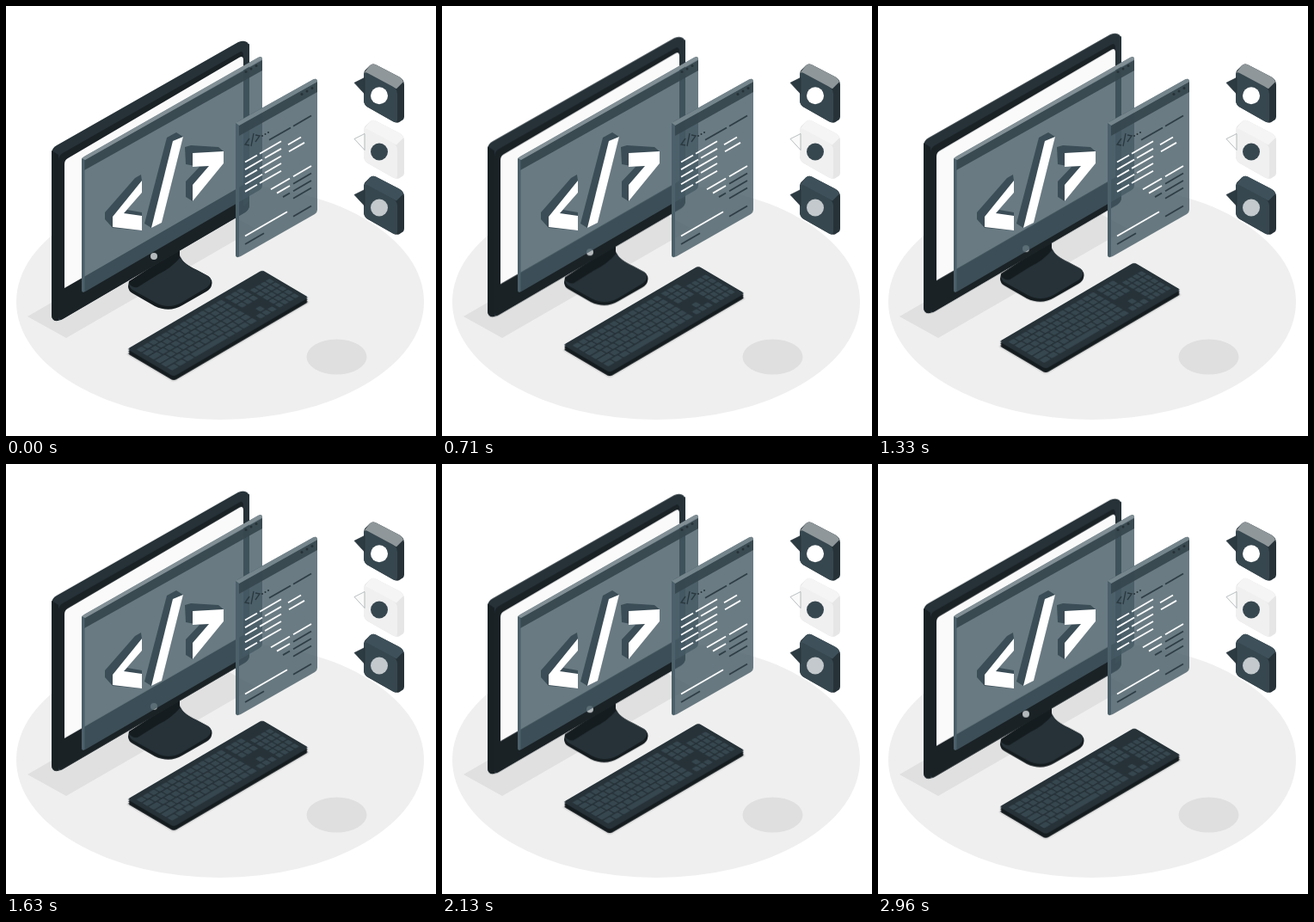
Animation of 500 by 500 pixels, one loop 3000 ms. Source, as an HTML page:

```html
<!DOCTYPE html>
<html lang="en">
<head>
<meta charset="utf-8">
<title>Isometric workstation</title>
<style>
  html, body { margin: 0; width: 100%; height: 100%; overflow: hidden; background: #fff; }
  svg { display: block; width: 100%; height: 100%; }
  .float { animation: float 3s linear infinite; }
  @keyframes float { 50% { transform: translateY(-10px); } }
</style>
</head>
<body>
<svg viewBox="0 0 500 500">
  <!-- floor -->
  <ellipse cx="249" cy="344" rx="237" ry="137" fill="#efefef"/>
  <path d="M25 361L70 386L290 259L245 234Z" fill="#e0e0e0"/>
  <ellipse cx="384.5" cy="408" rx="35" ry="20.5" fill="#dfdfdf"/>

  <g class="float">
    <!-- stand -->
    <path d="M143 320L202 282V290C204 298 214 303 222 307L235 314Q241 318 239 325Q238 329 233 332L205 348Q190 357 173 349L147 334Q142 331 142 326Z" fill="#151c1f"/>
    <path d="M153 327L177 312Q192 305 203 292C206 299 215 304 222 307L235 314Q242 319 234 327L204 345Q189 353 174 345L147 330Q143 327 143 323Q147 328 153 327Z" fill="#263238"/>

    <!-- monitor -->
    <path d="M53 172Q53 165 59 162L270 42Q281 38 283 47V231Q283 237 278 240L64 365Q53 369 53 359Z" fill="#263238"/>
    <path d="M53 168L61 173V366Q53 367 53 359Z" fill="#192125"/>
    <path d="M61 180Q61 174 66 171L271 54Q276 51 276 58L283 54V231Q283 237 278 240L66 364Q61 366 61 360Z" fill="#1a2226"/>
    <path d="M276 47L283 44V227L276 233Z" fill="#263238"/>
    <path d="M68 184Q68 179 72 177L271 60Q276 57 276 63V208L68 328Z" fill="#fafafa"/>
    <circle cx="172" cy="291" r="4" fill="#b4b9bb"/>

    <!-- keyboard, drawn flat and skewed -->
    <g id="keyboard" transform="matrix(1 -.586 1 .59 141 399)"></g>
  </g>

  <!-- main window -->
  <path d="M88 180Q88 177 91 175L293 60Q298 57 298 62V209Q298 212 295 214L94 331Q88 335 88 330Z" fill="#455a64" fill-opacity=".8"/>
  <path d="M91 179L298 63V75L91 191Z" fill="#37474f" fill-opacity=".95"/>
  <path d="M88 177L91 175L293 60Q297 58 298 62L92 179Z" fill="#829096"/>
  <path d="M88 177L91.500 179V332Q88 334 88 330Z" fill="#4b606a"/>

  <!-- code symbol -->
  <g fill="#3b4d56">
    <path d="M115 240L150 200L157 196L158 203V217L137 241L141 237L158 240V261L124 258L115 248Z"/>
    <path d="M187 153L198 147L206 152L181 252L169 258L161 253Z"/>
    <path d="M208 164L215 162L247 164L253 169V183L217 227L209 222V204L225 187L209 184Z"/>
  </g>
  <g fill="#fff">
    <path d="M158 203V217L137 241L158 244V261L124 257V245Z"/>
    <path d="M194 157L206 152L181 252L169 258Z"/>
    <path d="M217 171L253 169V183L217 227V208L236 186L217 187Z"/>
  </g>

  <!-- code panel -->
  <path d="M267 140Q267 136 270 134L357 85.500Q362 83 362 88V237Q362 240 359 242L273 291Q267 294 267 289Z" fill="#455a64" fill-opacity=".8"/>
  <path d="M271 139L362 88V100L271 151Z" fill="#37474f" fill-opacity=".95"/>
  <path d="M267 136L357 85.500Q361 83 362 88L271 139Z" fill="#75858c"/>
  <path d="M267 136L271 139V291Q267 293 267 289Z" fill="#4b606a"/>
  <path d="M283 154L278 161L283 162M288 148L285 163M290 150L295 151L290 158" fill="none" stroke="#2b3940" stroke-width="1.300"/>
  <g id="dots" fill="#263238"></g>
  <g id="code" stroke-width="1.800"></g>

  <g id="tiles"></g>
</svg>
<script>
const put = (id, parts) => { document.getElementById(id).innerHTML = parts.join(''); };
const range = n => [...Array(n).keys()];
const slope = 0.577;

// Keyboard
const slab = (grow, drop, color) =>
  `<rect x="${-grow}" y="${-grow}" width="${157 + 2 * grow}" height="${54 + 2 * grow}" rx="3"
    fill="${color}" transform="translate(${-drop * 0.85} ${drop * 0.85})"/>`;
const key = (x, row, w) =>
  `<rect x="${x}" y="${5.5 + row * 7.2}" width="${w}" height="5.7" rx=".8" fill="#37474f"/>`;
const keyRun = (x, end, row, n) => {
  const step = (end - x) / n;
  return range(n).map(i => key(x + i * step, row, step - 1.3)).join('');
};
const keyRow = row => {
  const indent = 6 + row * 1.8;
  const letters = row < 5
    ? key(5, row, indent) + keyRun(6.3 + indent, 105, row, 13 - (row >> 1))
    : keyRun(5, 32, row, 3) + key(32, row, 38) + keyRun(71.3, 105, row, 4);
  const middle = row === 3 ? '' : row === 4 ? key(114.7, row, 5.4) : keyRun(108, 128, row, 3);
  return letters + middle + (row ? keyRun(130, 154, row, 4) : '');
};
put('keyboard', [
  slab(1, 6, '#dedede'), slab(0, 5, '#151c1f'), slab(0, 2.5, '#151c1f'), slab(0, 0, '#263238'),
  ...range(6).map(keyRow)
]);

// Rows of three dots climbing along the title bars
const dots = (x, y, gap, r) => range(3).map(i =>
  `<circle cx="${x + i * gap}" cy="${y - i * gap * slope}" r="${r}"/>`).join('');
put('dots', [dots(279, 76.5, 6, 1.5), dots(344, 102.5, 6, 1.5), dots(298, 151, 3.5, 1)]);

// Code lines: y is the height at the left margin
const line = (y, from, to, color) =>
  `<path d="M${from} ${y - (from - 278) * slope}L${to} ${y - (to - 278) * slope}" stroke="${color}"/>`;
const light = '#fff', dark = '#2f3e46';
const upper = range(5).map(i => {
  const y = 181.5 + i * 8.6, split = 292 + (i % 2) * 6;
  return line(y, 278, split, light) + line(y, split + 3, 320, light)
    + (i && i < 3 ? line(y, 327 + i, 339 + i * 4, light) : '');
});
const lower = range(4).map(i => {
  const y = 230.5 + i * 8.5, color = i < 2 ? light : dark;
  return (i < 3 ? line(y, 308 + i * 7, 330, color) : '') + line(y, 334, 355, i ? dark : light);
});
put('code', [
  line(172, 306, 331, dark), line(172, 334, 355, dark), ...upper, ...lower,
  line(267.5, 278, 327, light), line(277, 278, 300, dark), line(277, 334, 355, dark)
]);

// Speech tiles
const tile = (dy, top, front, side, tail, line, badge) => `<g transform="translate(0 ${dy})">
  <path d="M416 81Q416 76 419 74L423 70Q426 67 430 69L457 83Q463 86 463 92V129Q463 133 460 134L457 136Q454 137 450 135L420 118Q416 115 416 110Z" fill="${side}"/>
  <path d="M416 79L423 70Q426 67 430 69L457 83Q461 85 462 89L454 97Z" fill="${top}"/>
  <path d="M416 81Q416 76 421 79L449 94Q455 97 455 103V132Q455 138 450 135L420 118Q416 115 416 110Z" fill="${front}"/>
  <path d="M405 90L417 84V103Z" fill="${tail}" stroke="${line}" stroke-width=".6" stroke-linejoin="round"/>
  <circle cx="434" cy="105" r="10" fill="${badge}"/>
</g>`;
put('tiles', [
  tile(-0.7, '#8f979a', '#37474f', '#263238', '#2c3a41', '#263238', '#fff'),
  tile(64.5, '#f5f5f5', '#f0f0f0', '#e6e6e6', '#fafafa', '#8b9498', '#37474f'),
  tile(129.5, '#3e515b', '#37474f', '#263238', '#2c3a41', '#263238', '#c3c9cc')
]);
</script>
</body>
</html>
```
